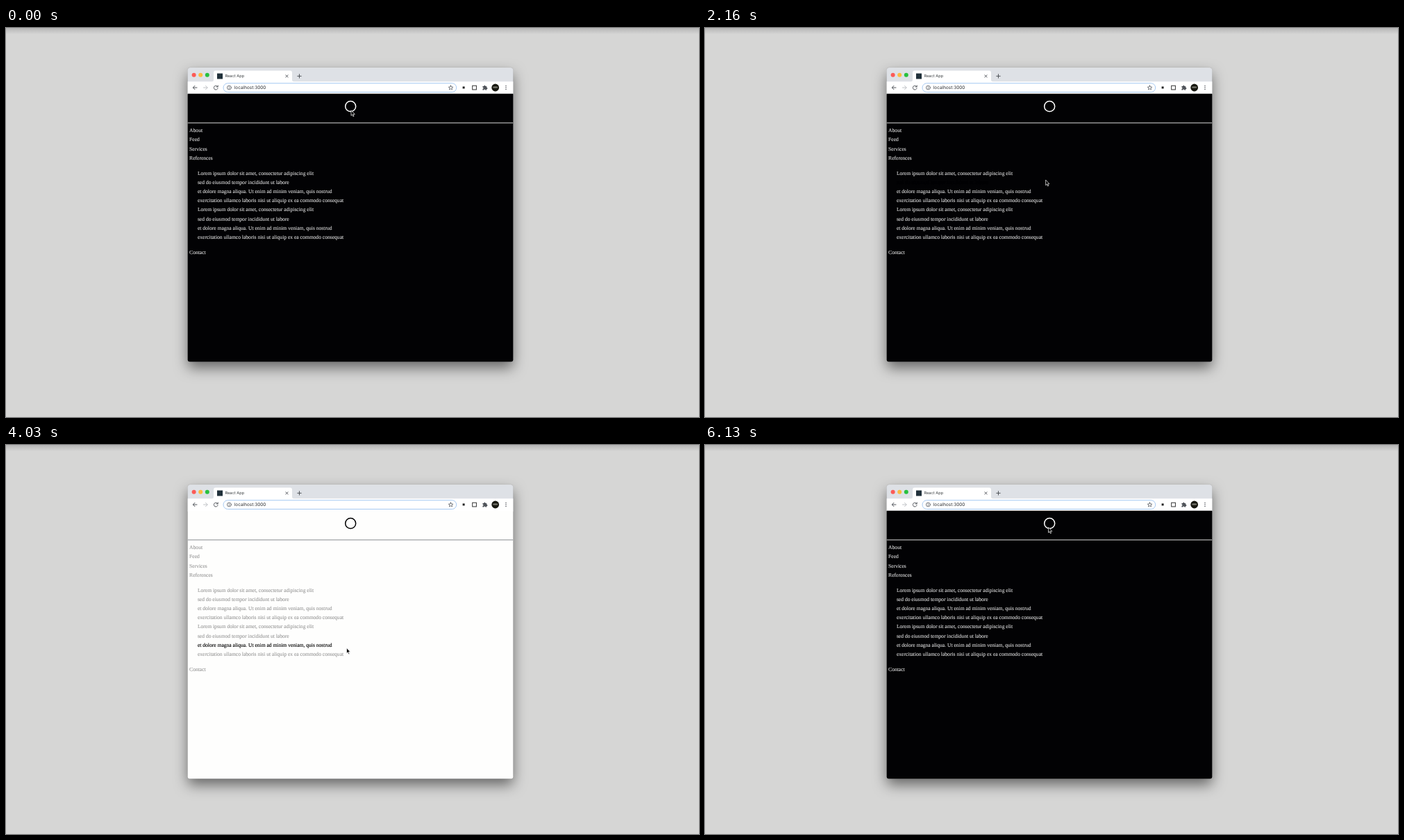
An HTML page for the animation above (6160 ms loop, 998x561 px).

```html
<!DOCTYPE html>
<html lang="en">
<head>
<meta charset="utf-8">
<title>Theme toggle</title>
<style>
  html, body { margin: 0; width: 100%; height: 100%; overflow: hidden; background: #d6d6d5; }
  body { position: relative; }
  .edge { position: absolute; inset: 0 0 auto; height: 9px; background: linear-gradient(#b5b5b5, #d6d6d5); }
  .shadow {
    position: absolute; left: 261.7px; top: 57.3px; width: 468.6px; height: 424px; border-radius: 4px;
    box-shadow: 0 9px 19px rgba(0, 0, 0, .52), 0 0 1px rgba(0, 0, 0, .35);
  }
  svg { position: absolute; left: 0; top: 0; width: 998px; height: 561px; display: block; }
  text { text-rendering: geometricPrecision; }
  .ui { font-family: Inter, Roboto, sans-serif; }
  .icon { fill: none; stroke: #50545a; stroke-linecap: round; stroke-linejoin: round; }
  .solid { fill: #50545a; }
  .thin { stroke-width: .8; }
  .off { stroke: #bfc2c6; }
  #page { --bg: #020204; --text: #d4d4d4; --hover: #020204; --mark: #fff; --rule: #a9a9a9; }
  #page.light { --bg: #fefefd; --text: #9c9c9c; --hover: #000; --mark: #000; --rule: #a4a6aa; }
  #paper { fill: var(--bg); }
  #rule { fill: var(--rule); }
  #mark { fill: none; stroke: var(--mark); stroke-width: 1.5; }
  #rows { font: 7.58px "Liberation Serif", "Times New Roman", serif; }
  #rows text { fill: var(--text); stroke: var(--text); stroke-width: .13; }
  #rows .on { fill: var(--hover); stroke: var(--hover); }
</style>
</head>
<body>
<div class="edge"></div>
<div class="shadow"></div>
<svg viewBox="0 0 998 561">
  <!-- browser frame -->
  <path d="M261.700 96V61.300a4 4 0 0 1 4-4H726.300a4 4 0 0 1 4 4V96Z" fill="#dee1e6"/>
  <path d="M261.700 77.300H296.500Q299 77.300 299 75V64.500Q299 61.500 302 61.500H409Q412 61.500 412 64.500V75Q412 77.300 414.500 77.300H730.300V95H261.700Z" fill="#fff"/>
  <circle cx="270.6" cy="67.7" r="3" fill="#fc5b57"/>
  <circle cx="280.2" cy="67.7" r="3" fill="#fdbc40"/>
  <circle cx="289.8" cy="67.7" r="3" fill="#28c13f"/>
  <rect x="304" y="65.5" width="8" height="8" fill="#20303a"/>
  <text class="ui" x="315.4" y="71.4" font-size="5.7" fill="#3c4043">React App</text>
  <path class="icon" d="M402.900 67.800l3.200 3.200m0-3.200l-3.200 3.200"/>
  <path class="icon" d="M419.800 69.400h5.400m-2.700-2.700v5.400"/>

  <!-- toolbar -->
  <path class="icon" d="M275 86h-5.600m2.600-2.700l-2.700 2.700l2.700 2.700"/>
  <path class="icon off" d="M284.500 86h5.600m-2.600-2.700l2.700 2.700l-2.700 2.700"/>
  <path class="icon" d="M304.700 84.500a2.900 2.900 0 1 0 .4 2.300M305.200 82.900v2h-2"/>
  <rect x="313" y="79.7" width="335.7" height="12.8" rx="6.4" fill="#fff" stroke="#a6c9f2"/>
  <circle class="icon thin" cx="321.4" cy="86" r="2.9"/>
  <path class="icon thin" d="M321.400 85.800v1.600m0-3.100v.1"/>
  <text class="ui" x="328.8" y="88.3" font-size="6.45" fill="#2b2e32">localhost:3000</text>
  <path class="icon thin" d="M640.500 82.900l.9 2.100 2.300.2-1.700 1.500.5 2.200-2-1.200-2 1.200.5-2.200-1.700-1.500 2.300-.2Z"/>
  <rect x="657.6" y="84.4" width="3" height="3" fill="#222"/>
  <rect x="671.7" y="83.2" width="5.7" height="5.7" fill="none" stroke="#333"/>
  <path class="solid" d="M686.400 84h1.700a1.200 1.200 0 0 1 2.400 0h1.700v1.700a1.200 1.200 0 0 1 0 2.400v1.500h-1.800a1.100 1.100 0 0 0-2.200 0h-1.800v-1.800a1.100 1.100 0 0 0 0-2.200Z"/>
  <circle cx="704.7" cy="86" r="5.4" fill="#17170f"/>
  <ellipse cx="704.7" cy="85.5" rx="3.7" ry="1.2" fill="#74746c"/>
  <path class="icon" d="M720 83.500h0M720 86h0M720 88.500h0" stroke-width="1.6"/>

  <g id="page">
    <path id="paper" d="M261.700 94.800H730.300V478.300a3 3 0 0 1-3 3H264.700a3 3 0 0 1-3-3Z"/>
    <rect id="rule" x="261.7" y="136.2" width="468.6" height="1.3"/>
    <circle id="mark" cx="496.2" cy="113" r="7.5"/>
    <g id="rows"></g>
  </g>
  <path id="cursor" d="M0 0V7.700L1.700 6.100 2.900 8.900 4.100 8.400 2.900 5.700H5.300Z" stroke="#fff" stroke-width=".7"/>
</svg>
<script>
const LOOP = 6160, PITCH = 13.23, HOVER_LAG = 20;
const LIGHT_ON = 2610, LIGHT_OFF = 5720;
const HOME = { x: 497, y: 118.7 };

// Each sweep eases the cursor to x, y; bow bends the way sideways
const sweeps = [
  { from: 160, to: 1290, x: 488, y: 327.5, bow: 0 },
  { from: 1650, to: 2650, x: 494.5, y: 118, bow: -0.7 },
  { from: 3160, to: 4290, x: 490, y: 317.6, bow: 0 },
  { from: 4700, to: 5735, x: 493.7, y: 107.5, bow: 3 },
  { from: 6030, to: 6130, x: 494.5, y: 118.7, bow: 0 }
];

const lorem = [
  'Lorem ipsum dolor sit amet, consectetur adipiscing elit',
  'sed do eiusmod tempor incididunt ut labore',
  'et dolore magna aliqua. Ut enim ad minim veniam, quis nostrud',
  'exercitation ullamco laboris nisi ut aliquip ex ea commodo consequat'
];

const page = document.getElementById('page');
const cursor = document.getElementById('cursor');
const list = document.getElementById('rows');
const rows = [];

function addRows(lines, x, mid) {
  lines.forEach((line, i) => {
    const el = document.createElementNS('http://www.w3.org/2000/svg', 'text');
    const y = mid + i * PITCH;
    el.textContent = line;
    el.setAttribute('x', x);
    el.setAttribute('y', y + 2.4);
    list.append(el);
    rows.push({ el, y });
  });
}

addRows(['About', 'Feed', 'Services', 'References'], 264.1, 147.7);
addRows([...lorem, ...lorem], 275.9, 209.1);
addRows(['Contact'], 264.1, 323.4);

function cursorAt(t) {
  let { x, y } = HOME;
  for (const s of sweeps) {
    const u = Math.min(1, Math.max(0, (t - s.from) / (s.to - s.from)));
    const ease = (1 - Math.cos(Math.PI * u)) / 2;
    x += (s.x - x) * ease + s.bow * Math.sin(Math.PI * u);
    y += (s.y - y) * ease;
  }
  return { x, y };
}

function draw() {
  const t = performance.now() % LOOP;
  const { x, y } = cursorAt(t);
  const hover = cursorAt(t - HOVER_LAG);
  cursor.setAttribute('transform', `translate(${x} ${y})`);
  page.classList.toggle('light', t >= LIGHT_ON && t < LIGHT_OFF);
  for (const row of rows) row.el.classList.toggle('on', Math.abs(hover.y - row.y) < PITCH / 2);
  requestAnimationFrame(draw);
}
draw();
</script>
</body>
</html>
```
